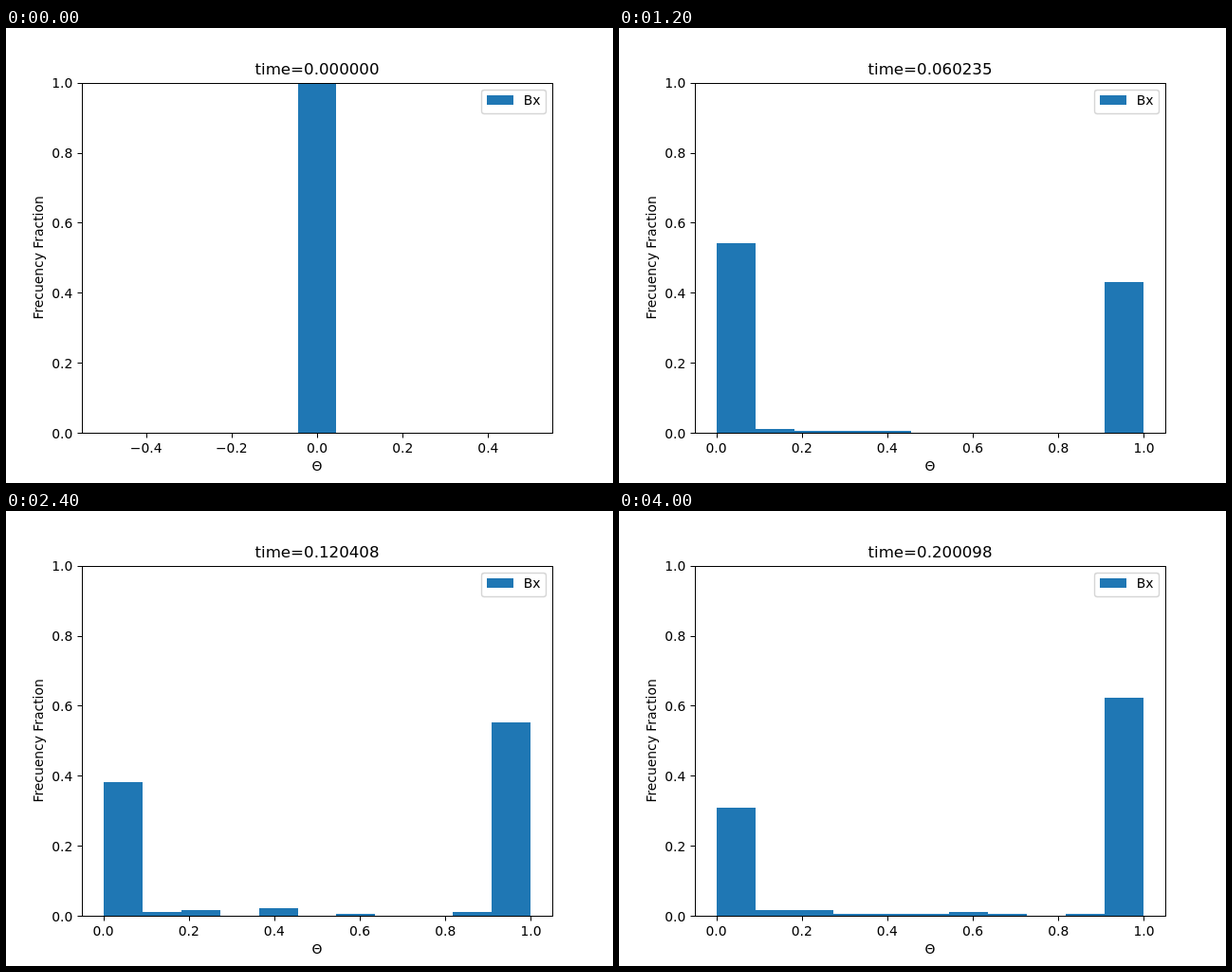
These frames come from a looping animation (640 px wide and 480 px high, 4.2 s). An HTML page:

```html
<!DOCTYPE html>
<html lang="en">
<head>
<meta charset="utf-8">
<title>Histogram over time</title>
<style>
  html, body { margin: 0; width: 100%; height: 100%; overflow: hidden; background: #fff; }
  svg { display: block; }
  text { font: 13.889px "DejaVu Sans", sans-serif; fill: #000; }
  .mid { text-anchor: middle; }
  .end { text-anchor: end; }
  #title { font-size: 16.667px; }
  .bar { fill: #1f77b4; shape-rendering: crispEdges; }
  .line { fill: none; stroke: #000; stroke-width: 1; }
</style>
</head>
<body>
<svg width="640" height="480" viewBox="0 0 640 480">
  <g id="bars"></g>
  <rect class="line" x="80.5" y="58.5" width="496" height="369"/>
  <g id="yAxis"></g>
  <g id="xAxis"></g>
  <text id="title" class="mid" x="328" y="49"></text>
  <text class="mid" x="328" y="467">Θ</text>
  <text class="mid" transform="translate(39 242.4) rotate(-90)">Frecuency Fraction</text>
  <rect x="501.5" y="65.5" width="68" height="25" rx="2.8" fill="#fff" fill-opacity=".8" stroke="#ccc" stroke-opacity=".8" stroke-width="1.39"/>
  <rect class="bar" x="507" y="71" width="28" height="10"/>
  <text x="545.8" y="81">Bx</text>
</svg>
<script>
const STEP = 200, STEPS = 21, BINS = 11;
const LEFT = 102.545, WIDTH = 450.909, BASE = 427.2, HEIGHT = 369.6;

// step, simulated time, particles per bin
const keys = [
  [0, 0, [185, 0, 0, 0, 0, 0, 0, 0, 0, 0, 0]],
  [4, 0.040298, [117, 2, 1, 1, 0, 0, 0, 0, 0, 0, 64]],
  [9, 0.090141, [77, 2, 1, 0, 2, 0, 0, 1, 0, 0, 103]],
  [12, 0.120408, [71, 2, 3, 0, 4, 0, 1, 0, 0, 2, 103]],
  [14, 0.140270, [74, 3, 5, 3, 0, 1, 0, 1, 0, 1, 103]],
  [17, 0.170218, [46, 7, 1, 4, 1, 3, 0, 0, 2, 0, 127]],
  [20, 0.200098, [59, 3, 3, 1, 1, 1, 2, 1, 0, 1, 119]]
];

const $ = id => document.getElementById(id);

function add(parent, tag, attrs, text = "") {
  const el = document.createElementNS("http://www.w3.org/2000/svg", tag);
  for (const name in attrs) el.setAttribute(name, attrs[name]);
  el.textContent = text;
  return parent.appendChild(el);
}

const label = v => v.toFixed(1).replace("-", "\u2212");

function drawXAxis(first, last, origin) {
  const axis = $("xAxis");
  axis.replaceChildren();
  for (let i = first; i <= last; i++) {
    const x = origin + i * WIDTH / 5;
    add(axis, "path", { class: "line", d: `M${Math.round(x) + 0.5} 427.5v5` });
    add(axis, "text", { class: "mid", x, y: 448 }, label(i / 5));
  }
}

for (let i = 0; i <= 5; i++) {
  const y = BASE - i * HEIGHT / 5;
  add($("yAxis"), "path", { class: "line", d: `M80.5 ${Math.round(y) + 0.5}h-5` });
  add($("yAxis"), "text", { class: "end", x: 70.3, y: Math.round(y + 5.3) }, label(i / 5));
}

const edge = i => Math.round(LEFT + i * WIDTH / BINS);
const bars = Array.from({ length: BINS }, (_, i) =>
  add($("bars"), "rect", { class: "bar", x: edge(i), width: edge(i + 1) - edge(i) }));

function stateAt(step) {
  const n = Math.max(1, keys.findIndex(k => k[0] >= step));
  const [s0, t0, c0] = keys[n - 1], [s1, t1, c1] = keys[n];
  const mix = (a, b) => a + (b - a) * (step - s0) / (s1 - s0);
  return { time: mix(t0, t1), counts: c0.map((c, i) => Math.round(mix(c, c1[i]))) };
}

function draw(step) {
  let { time, counts } = stateAt(step);
  if (step === 0) {
    counts = counts.map((_, i) => i === 5 ? 1 : 0);
    drawXAxis(-2, 2, 328);
  } else {
    drawXAxis(0, 5, LEFT);
  }
  const total = counts.reduce((a, b) => a + b);
  bars.forEach((bar, i) => {
    const top = Math.round(BASE - HEIGHT * counts[i] / total);
    bar.setAttribute("y", top);
    bar.setAttribute("height", 427 - top);
  });
  $("title").textContent = "time=" + time.toFixed(6);
}

let shown = -1;
const start = performance.now();
function tick(now) {
  const step = Math.floor(Math.max(0, now - start) / STEP) % STEPS;
  if (step !== shown) draw(shown = step);
  requestAnimationFrame(tick);
}
tick(start);
</script>
</body>
</html>
```
